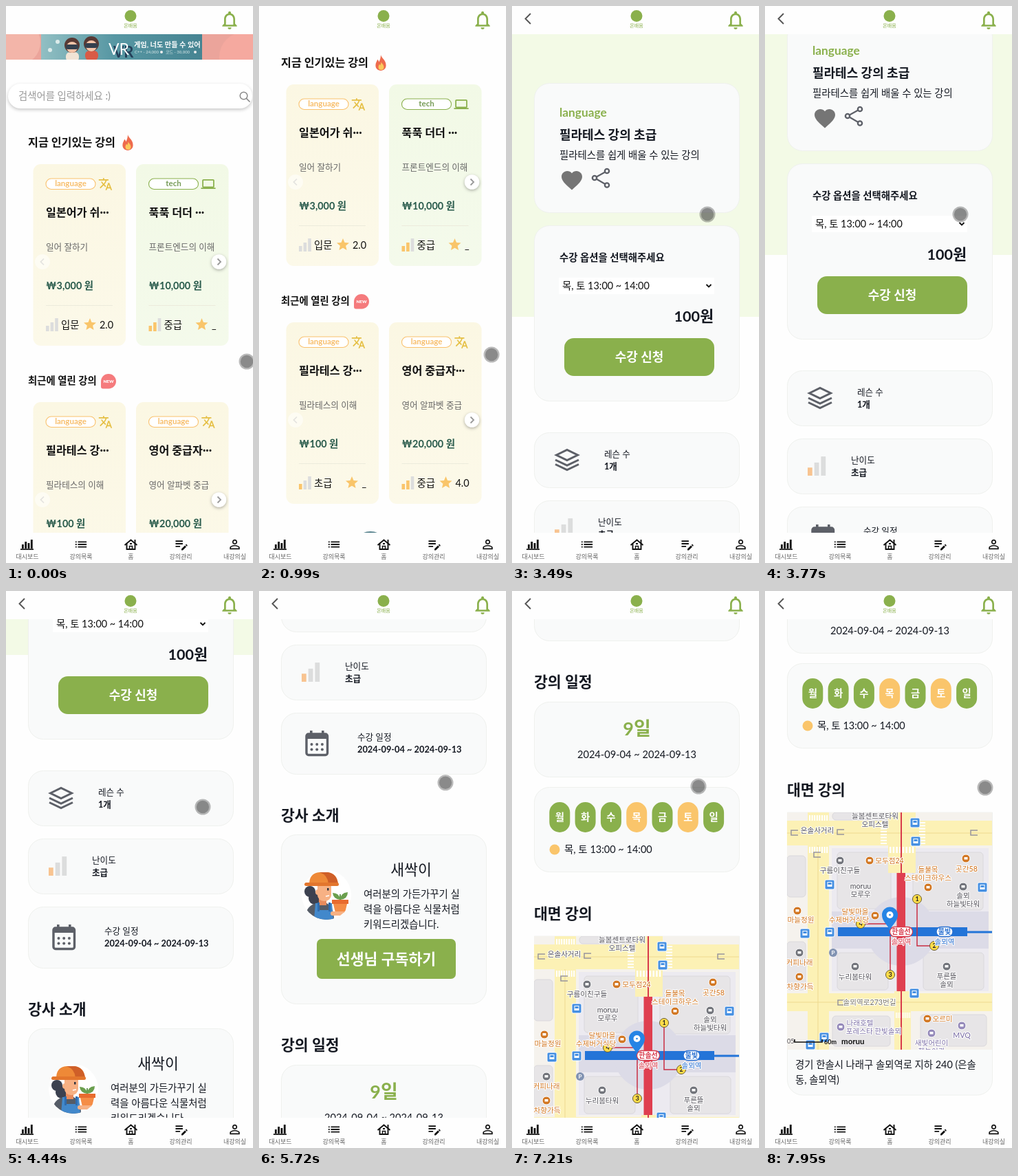
Animation, 359 px wide and 810 px high, one loop 8000 ms. Source, as an HTML page with a canvas:

```html
<!DOCTYPE html>
<html lang="ko">
<head>
<meta charset="utf-8">
<title>강의 앱</title>
<style>
html, body { margin: 0; width: 100%; height: 100%; overflow: hidden; background: #fefefe; }
canvas { display: block; width: 359px; height: 810px; }
</style>
</head>
<body>
<canvas id="stage"></canvas>
<script>
const W = 359, H = 810, LOOP = 8000, OPEN_AT = 1890;
const FONT = 'Lato, "Noto Sans CJK KR", "Noto Sans CJK", "Noto Sans CJK JP", sans-serif';
const GREEN = '#8ab04c', AMBER = '#fac56b', INK = '#141821', GREY = '#5d6068';
const stage = document.getElementById('stage');
const c = stage.getContext('2d');
const dpr = window.devicePixelRatio || 1;
stage.width = W * dpr;
stage.height = H * dpr;

const ICON = {
  translate: 'M12.87 15.07l-2.54-2.51.03-.03c1.74-1.94 2.98-4.17 3.71-6.53H17V4h-7V2H8v2H1v1.99h11.17C11.5 7.92 10.44 9.75 9 11.35 8.07 10.32 7.3 9.19 6.69 8h-2c.73 1.63 1.73 3.17 2.98 4.56l-5.09 5.02L4 19l5-5 3.11 3.11.76-2.04zM18.5 10h-2L12 22h2l1.12-3h4.75L21 22h2l-4.5-12zm-2.62 7l1.62-4.33L19.12 17h-3.24z',
  laptop: 'M20 18c1.1 0 1.99-.9 1.99-2L22 6c0-1.1-.9-2-2-2H4c-1.1 0-2 .9-2 2v10c0 1.1.9 2 2 2H0v2h24v-2h-4zM4 6h16v10H4V6z',
  bell: 'M12 22c1.1 0 2-.9 2-2h-4c0 1.1.89 2 2 2zm6-6v-5c0-3.07-1.64-5.64-4.5-6.32V4c0-.83-.67-1.5-1.5-1.5s-1.5.67-1.5 1.5v.68C7.63 5.36 6 7.92 6 11v5l-2 2v1h16v-1l-2-2zm-2 1H8v-6c0-2.48 1.51-4.5 4-4.5s4 2.02 4 4.5v6z',
  list: 'M3 13h2v-2H3v2zm0 4h2v-2H3v2zm0-8h2V7H3v2zm4 4h14v-2H7v2zm0 4h14v-2H7v2zM7 7v2h14V7H7z',
  edit: 'M3 10h11v2H3v-2zm0-2h11V6H3v2zm0 8h7v-2H3v2zm15.01-3.13.71-.71c.39-.39 1.02-.39 1.41 0l.71.71c.39.39.39 1.02 0 1.41l-.71.71-2.12-2.12zm-.71.71-5.3 5.3V21h2.12l5.3-5.3-2.12-2.12z',
  person: 'M12 5.9c1.16 0 2.1.94 2.1 2.1s-.94 2.1-2.1 2.1S9.9 9.16 9.9 8s.94-2.1 2.1-2.1m0 9c2.97 0 6.1 1.46 6.1 2.1v1.1H5.9V17c0-.64 3.13-2.1 6.1-2.1M12 4C9.79 4 8 5.79 8 8s1.79 4 4 4 4-1.79 4-4-1.79-4-4-4zm0 9c-2.67 0-8 1.34-8 4v3h16v-3c0-2.66-5.33-4-8-4z',
  star: 'M12 17.27L18.18 21l-1.64-7.03L22 9.24l-7.19-.61L12 2 9.19 8.63 2 9.24l5.46 4.73L5.82 21z',
  heart: 'M12 21.35l-1.45-1.32C5.4 15.36 2 12.28 2 8.5 2 5.42 4.42 3 7.5 3c1.74 0 3.41.81 4.5 2.09C13.09 3.81 14.76 3 16.5 3 19.58 3 22 5.42 22 8.5c0 3.78-3.4 6.86-8.55 11.54L12 21.35z',
  flame: 'M12 0C13 5 20 8 20 16c0 5-3.5 8-8 8s-8-3-8-8c0-4 2-6 3-9 1 1 2 2 2 4 2-3 3-7 3-11z'
};
for (const k in ICON) ICON[k] = new Path2D(ICON[k]);

// Drawing helpers
function text(s, x, y, size, color = INK, weight = 400, align = 'left') {
  c.font = `${weight} ${size}px ${FONT}`;
  c.textAlign = align;
  c.fillStyle = color;
  c.fillText(s, x, y + size * 0.37);
}
const mid = (s, x, y, size, color, weight) => text(s, x, y, size, color, weight, 'center');
function rect(x, y, w, h, color) {
  c.fillStyle = color;
  c.fillRect(x, y, w, h);
}
function box(x, y, w, h, r, fill, edge, lw = 1) {
  c.beginPath();
  c.roundRect(x, y, w, h, r);
  if (fill) { c.fillStyle = fill; c.fill(); }
  if (edge) { c.strokeStyle = edge; c.lineWidth = lw; c.stroke(); }
}
function disc(x, y, r, fill, edge, lw = 1) {
  box(x - r, y - r, 2 * r, 2 * r, r, fill, edge, lw);
}
function line(pts, color, lw, close) {
  c.beginPath();
  for (let i = 0; i < pts.length; i += 2) c.lineTo(pts[i], pts[i + 1]);
  if (close) c.closePath();
  c.strokeStyle = color;
  c.lineWidth = lw;
  c.stroke();
}
function icon(name, x, y, scale, color) {
  c.save();
  c.translate(x - 12 * scale, y - 12 * scale);
  c.scale(scale, scale);
  c.fillStyle = color;
  c.fill(ICON[name], 'evenodd');
  c.restore();
}
function shifted(dy, draw) {
  c.save();
  c.translate(0, dy);
  draw();
  c.restore();
}
function shadowed(color, blur, dy, draw) {
  c.save();
  c.shadowColor = color;
  c.shadowBlur = blur * dpr;
  c.shadowOffsetY = dy * dpr;
  draw();
  c.restore();
}
function bars(x, y, level, s = 1, on = AMBER) {
  [8, 13, 19].forEach((h, i) =>
    rect(x + i * 6.6 * s, y - h * s, 4.6 * s, h * s, i < level ? on : '#dcdddd'));
}

// Timing: every move advances in n even steps between two times
function phase(t, t0, t1, n) {
  if (t < t0) return 0;
  if (n < 2) return 1;
  return Math.min(1, (Math.floor((t - t0) / (t1 - t0) * (n - 1) + 0.1) + 1) / n);
}
const ease = (p, a) => p ** a / (p ** a + (1 - p) ** a);
const HOME_SCROLL = [[650, 1270, 10, 180, 1.47]];
const CLASS_SCROLL = [
  [3280, 3770, 8, 180, 1.47], [4100, 4440, 5, 269, 2.2], [5040, 5390, 6, 270, 2.2],
  [5720, 6000, 5, 270, 2.2], [6940, 7210, 5, 270, 2.2], [7410, 7950, 9, 180, 1.47]
];
const scrollAt = (t, moves) => Math.round(moves.reduce(
  (sum, [t0, t1, n, d, a]) => sum + d * ease(phase(t, t0, t1, n), a), 0));
const TOUCH = [
  [120, 190, 2, 340, 517], [650, 990, 6, 338, 507], [1470, 1750, 4, 117, 516.5],
  [2470, 2470, 1, 117, 509.5], [2930, 3080, 3, 249, 306], [3280, 3490, 4, 284, 303],
  [4100, 4440, 5, 286, 314], [4710, 4780, 2, 268, 236], [5040, 5390, 6, 271, 278],
  [5720, 6000, 5, 271, 282], [6610, 6610, 1, 271, 284], [7410, 7950, 9, 320, 286]
];
function touch(t) {
  let x = 350, y = 517;
  for (const [t0, t1, n, tx, ty] of TOUCH) {
    const p = phase(t, t0, t1, n);
    x += (tx - x) * p;
    y += (ty - y) * p;
  }
  disc(x, y, 11.5, 'rgba(0,0,0,.27)');
  disc(x, y, 9.2, 'rgba(0,0,0,.25)');
}

// Home page
function banner() {
  rect(0, 41, W, 37, '#eba49b');
  c.save();
  c.beginPath();
  c.rect(0, 41, W, 37);
  c.clip();
  disc(18, 53, 32, '#f3b5a9');
  disc(346, 74, 36, '#f5a99f');
  const g = c.createLinearGradient(51, 0, 285, 0);
  g.addColorStop(0, '#91bfc3');
  g.addColorStop(0.45, '#5797a3');
  g.addColorStop(1, '#468492');
  rect(51, 41, 234, 37, g);
  for (const [x, y, top] of [[96, 62, '#f1e4d5'], [124, 60, '#d85b47']]) {
    box(x - 9, y + 5, 19, 14, 6, top);
    disc(x, y - 5, 11, '#583a35');
    disc(x, y - 2, 8, '#f5c4a8');
    box(x - 9, y - 6, 18, 7, 3, '#34404e');
  }
  disc(75, 52, 3, '#dcebea');
  disc(64, 64, 3, '#dcebea');
  text('VR', 156, 67, 22, '#243f59', 700);
  text('VR', 149, 62, 23, '#fff');
  text('게임, 너도 만들 수 있어', 186, 56, 10.2, '#fff', 700);
  text('C++ - 24,000', 187, 67, 6, '#dcebeb');
  disc(226, 67, 2, '#eee');
  text('코드 - 30,000', 232, 67, 6, '#dcebeb');
  disc(275, 67, 2, '#eee');
  c.restore();
}
function lesson(x, tech, title, sub, price, level, grade, score, starX) {
  const g = c.createLinearGradient(0, 230, 0, 494);
  g.addColorStop(0, tech ? '#f2f9e6' : '#fbf7e3');
  g.addColorStop(1, tech ? '#f4faeb' : '#fcf9e9');
  box(x, 230, 134.5, 264, 11, g);
  const l = x + 18.5, hue = tech ? GREEN : '#f9c16d';
  box(l, 251, 72, 15.5, 7.8, '#fff', hue, 1.1);
  mid(tech ? 'tech' : 'language', l + 36, 258, 11.5, tech ? '#769b57' : '#f7bd69', 700);
  icon(tech ? 'laptop' : 'translate', x + 105, 259, 0.88, tech ? GREEN : '#e5bf43');
  text(title + '···', l, 300, 16.2, '#111', 700);
  text(sub, l, 350, 12.6, '#666');
  text(price, l, 407, 14.4, '#285a4b', 700);
  rect(l, 435, 97, 1, '#ecebdc');
  bars(l, 473, level);
  text(grade, l + 22, 464, 14.4, '#111');
  icon('star', x + starX, 463, 0.9, '#f9c56a');
  text(score, x + 116.5, 464, 14.4, '#111', 400, score === '_' ? 'right' : 'right');
}
function arrows() {
  c.save();
  c.globalAlpha = 0.5;
  disc(53, 372, 11, '#fff');
  line([55, 367.5, 50.5, 372, 55, 376.5], '#ccc', 1.7);
  c.restore();
  shadowed('rgba(0,0,0,.3)', 4, 1.5, () => disc(309.5, 372, 10.8, '#fff'));
  line([307.5, 367.5, 312, 372, 307.5, 376.5], '#999', 1.8);
}
function home(scroll) {
  c.translate(0, -scroll);
  banner();
  shadowed('rgba(0,0,0,.22)', 5, 2, () => box(3, 113, 355, 36, 18, '#fff'));
  text('검색어를 입력하세요 :)', 18, 131, 14.4, '#999', 500);
  c.lineCap = 'round';
  disc(345.5, 130.5, 5.3, null, '#888', 1.5);
  line([349.5, 134.5, 354, 139], '#888', 1.7);
  c.lineCap = 'butt';

  text('지금 인기있는 강의', 32, 198, 16.2, '#111', 700);
  icon('flame', 177, 198.5, 0.95, '#ee6b4d');
  icon('flame', 177.5, 203, 0.5, '#fbc95c');
  lesson(39.5, false, '일본어가 쉬', '일어 잘하기', '₩3,000 원', 0, '입문', '2.0', 82.5);
  lesson(189, true, '푹푹 더더 ', '프론트엔드의 이해', '₩10,000 원', 2, '중급', '_', 95.5);
  arrows();

  text('최근에 열린 강의', 32, 545, 14.4, '#111', 700);
  box(138, 535, 22, 21.5, [11, 11, 11, 3], '#f57b7d');
  mid('NEW', 149, 546, 6.2, '#fff', 900);
  shifted(346, () => {
    lesson(39.5, false, '필라테스 강', '필라테스의 이해', '₩100 원', 1, '초급', '_', 95.5);
    lesson(189, false, '영어 중급자', '영어 알파벳 중급', '₩20,000 원', 2, '중급', '4.0', 82.5);
    arrows();
  });
  disc(162, 908, 28, '#55818c');
}

// Class page; sections sit at their own scroll positions
function card(y, bottom) {
  box(32.5, y + 0.5, 298, bottom - y - 1, 22, '#f9fafa', '#eff1ee');
}
function summary() {
  rect(0, -200, W, 652, '#f3fae6');
  card(112, 301);
  text('language', 69, 155, 17.3, GREEN, 700);
  text('필라테스 강의 초급', 69, 187, 18, INK, 700);
  text('필라테스를 쉽게 배울 수 있는 강의', 69, 217, 14.4);
  icon('heart', 87, 253.5, 1.5, '#757575');
  line([138, 240, 120, 250, 138, 260.5], GREY, 2.2);
  for (const [x, y] of [[138, 240], [120, 250], [138, 260.5]]) disc(x, y, 3.1, '#f9fafa', GREY, 2.4);

  card(319, 575);
  text('수강 옵션을 선택해주세요', 69, 366, 14.4, INK, 700);
  rect(68, 395, 226, 24, '#fff');
  text('목, 토 13:00 ~ 14:00', 73, 407, 14.4, '#111');
  line([282.5, 405, 286, 408.5, 289.5, 405], '#111', 1.9);
  text('100원', 293, 451, 21.6, INK, 700, 'right');
  box(76, 483, 218, 55, 14, GREEN);
  mid('수강 신청', 185, 510, 18, '#fff', 700);
}
function facts() {
  card(261, 342);
  line([64.5, 294, 80, 286.5, 95.5, 294, 80, 301.5], GREY, 3, true);
  line([63, 301, 80, 309, 97, 301], GREY, 3);
  line([63, 307.5, 80, 315.5, 97, 307.5], GREY, 3);
  text('레슨 수', 134, 292, 12.6, INK, 500);
  text('1개', 134, 310, 12.6, INK, 700);
  card(360, 441);
  bars(62, 414, 1, 1.47, '#f8c491');
  text('난이도', 125, 391, 12.6, INK, 500);
  text('초급', 125, 409, 12.6, INK, 700);
  card(459, 549);
  box(69, 490, 30.5, 30.5, 3, null, GREY, 3.4);
  rect(69, 489, 30, 8, GREY);
  rect(74, 485, 3.6, 6, GREY);
  rect(91, 485, 3.6, 6, GREY);
  for (let i = 0; i < 6; i++) disc(76.5 + i % 3 * 7.7, 505 + (i > 2) * 7.5, 2, GREY);
  text('수강 일정', 143, 494, 12.6, INK, 500);
  text('2024-09-04 ~ 2024-09-13', 143, 512, 12.8, INK, 700);
}
function shape(d, color) {
  c.fillStyle = color;
  c.fill(new Path2D(d));
}
function gardener() {
  c.save();
  c.beginPath();
  c.arc(98, 442, 36, 0, 7);
  c.fillStyle = '#fff';
  c.fill();
  c.clip();
  disc(74, 437, 8, '#3c4150');
  disc(81, 447, 9, '#3c4150');
  shape('M67 478q0-22 20-25h8q14 3 14 25z', '#555c67');
  rect(87, 444, 11, 13, '#e98c5d');
  box(85, 424, 20, 27, [3, 3, 9, 9], '#f7b184');
  disc(86, 438, 4, '#f7b184');
  rect(99, 432, 2.5, 3.5, '#30343f');
  line([97, 444, 102, 443], '#fff', 1.6);
  shape('M82 454h5v10h14v-10h5l2 24H80z', '#4288cb');
  rect(85, 453, 3, 13, '#2f6cae');
  rect(101, 453, 3, 13, '#2f6cae');
  shape('M73 427q0-17 15-18h12q14 2 15 18z', '#ee8937');
  shape('M88 409h12q13 2 15 17h-14q-1-13-13-17z', '#cf5f28');
  box(66, 424, 50, 5, 2.5, '#e3762d');
  line([118, 452, 118, 441], '#5a9147', 1.8);
  shape('M118 449q-10-1-11-10 10 0 11 10zM118 449q0-10 11-11 0 10-11 11z', '#6b9f4e');
  rect(106, 449, 24, 6, '#e86b2e');
  shape('M108 455h20l-3 13h-14z', '#f58d46');
  box(104, 466, 22, 6, 3, '#f7b184');
  c.restore();
}
function teacher() {
  text('강사 소개', 32, 326, 21.6, INK, 700);
  card(354, 601);
  gardener();
  mid('새싹이', 221, 405, 21.6, INK, 500);
  ['여러분의 가든가꾸기 실', '력을 아름다운 식물처럼', '키워드리겠습니다.']
    .forEach((s, i) => text(s, 152, 441 + i * 21.7, 14.4));
  box(84, 506, 202, 58, 7, GREEN);
  mid('선생님 구독하기', 185, 535, 21.6, '#fff', 700);
}
function schedule() {
  text('강의 일정', 32, 402, 21.6, INK, 700);
  card(431, 541);
  mid('9일', 181.5, 470, 27, GREEN, 700);
  mid('2024-09-04 ~ 2024-09-13', 181.5, 508, 14.6, INK);
  card(555, 679);
  [...'월화수목금토일'].forEach((d, i) => {
    const x = 69.3 + i * 37.3;
    box(x - 15, 577, 30, 44, 15, '목토'.includes(d) ? AMBER : GREEN);
    mid(d, x, 599, 14.4, '#fff', 700);
  });
  disc(62, 646, 7.5, AMBER);
  text('목, 토 13:00 ~ 14:00', 76, 646, 14.5);
}

function label(x, y, color, ...rows) {
  c.lineJoin = 'round';
  rows.forEach((s, i) => {
    c.font = `500 10.6px ${FONT}`;
    c.textAlign = 'center';
    c.strokeStyle = '#fff';
    c.lineWidth = 2.2;
    c.strokeText(s, x, y + i * 12 + 3.9);
    mid(s, x, y + i * 12, 10.6, color, 500);
  });
  c.lineJoin = 'miter';
}
function spot(x, y, color) {
  disc(x, y, 6, color, '#fff');
  rect(x - 2.5, y - 2, 5, 3.5, '#fff');
}
function map() {
  c.save();
  c.beginPath();
  c.rect(32, 322, 298, 345);
  c.clip();
  rect(32, 322, 298, 345, '#f5f2ed');
  const road = '#fcf1b5', block = '#e7e5e7', mall = '#dcdbe7';
  rect(97, 374, 228, 208, '#eceaf0');
  for (const [x, y, w, h] of [[105, 380, 78, 82], [215, 380, 102, 84], [105, 526, 74, 54],
    [230, 526, 88, 54], [98, 618, 84, 44], [226, 616, 96, 46], [32, 385, 27, 60], [32, 510, 27, 70],
    [98, 322, 82, 11]]) box(x, y, w, h, 5, block, '#dad8dc');
  rect(97, 466, 228, 54, mall);
  disc(198, 495, 50, mall);
  rect(32, 334, 298, 36, road);
  rect(62, 322, 31, 345, road);
  rect(179, 322, 40, 88, road);
  rect(32, 585, 298, 26, road);
  rect(188, 582, 24, 85, road);
  line([32, 352, 330, 352], '#eed98f', 1);
  line([77, 370, 77, 667], '#eed98f', 1);
  line([32, 598, 330, 598], '#eed98f', 1);
  for (let i = 0; i < 8; i++) {
    rect(64 + i * 3.6, 326, 2, 8, '#fff');
    rect(64 + i * 3.6, 372, 2, 9, '#fff');
    rect(181 + i * 4.7, 372, 2.4, 9, '#fff');
    rect(224, 336 + i * 4.3, 9, 2, '#fff');
    rect(168, 336 + i * 4.3, 9, 2, '#fff');
    rect(190 + i * 2.8, 613, 1.5, 8, '#fff');
  }
  const turn = '#96949c';
  for (const [x, y] of [[43, 351], [110, 350], [304, 351], [76, 383], [111, 598]])
    line([x + 5, y + 4, x - 5, y + 4, x - 5, y - 3, x + 5, y - 3], turn, 1.5);

  rect(197, 322, 2, 345, '#d83a4b');
  rect(191.5, 410, 12.5, 172, '#df3f50');
  rect(106, 489, 188, 13, '#2374d8');
  rect(294, 494.5, 36, 3, '#2374d8');
  const exit = '#c92e43';
  line([139, 484, 182, 484, 182, 490], exit, 1.5);
  line([182, 502, 182, 558], exit, 1.5);
  line([221, 448, 221, 516, 246, 516], exit, 1.5);
  [[221, 448], [246, 516], [182, 558], [139, 484]].forEach(([x, y], i) => {
    disc(x, y, 6.5, '#ffdd4a', '#665b30');
    mid(i + 1, x, y, 9, '#222', 700);
  });

  const food = '#d27723', dark = '#55535b', plum = '#7f72a8', blue = '#286fd0';
  for (const [x, y] of [[218, 337], [219, 364], [94, 427], [58, 498], [316, 431], [94, 496], [217, 585], [86, 649], [66, 660]]) {
    box(x - 7, y - 7, 14, 14, 2, '#4690e2', '#fff');
    rect(x - 3.5, y - 4, 7, 7, '#fff');
    rect(x - 2.5, y - 3, 5, 3, '#4690e2');
  }
  for (const [x, y] of [[152, 392], [292, 389], [237, 431], [160, 472], [47, 465], [50, 561], [236, 622]]) spot(x, y, food);
  for (const [x, y] of [[109, 392], [288, 430], [131, 546], [264, 546], [50, 526]]) spot(x, y, '#72747b');
  for (const [x, y] of [[110, 634], [242, 643], [286, 632]]) spot(x, y, '#958aba');
  disc(99, 526, 6, '#8193b2');
  mid('P', 99, 526, 8, '#fff', 700);
  label(76, 348, dark, '은솔사거리');
  label(160, 327, dark, '늘봄센트로타워', '오피스텔');
  label(181, 392, food, '모두점24');
  label(109, 406, dark, '구름이친구들');
  label(139, 429, dark, 'moruu', '모루우');
  label(237, 405, food, '들불목', '스테이크하우스');
  label(293, 404, food, '곳간58');
  label(288, 443, dark, '솔뫼', '하늘빛타워');
  label(131, 466, food, '달빛마을');
  label(122, 478, food, '수제버거식당');
  label(52, 478, food, '마늘정원');
  label(50, 540, food, '커피나래');
  label(51, 575, food, '차향가득');
  label(131, 561, dark, '누리봄타워');
  label(264, 560, dark, '푸른뜰', '솔뫼');
  label(152, 598, '#7d7968', '솔뫼역로273번길');
  label(138, 628, plum, '나래호텔');
  label(158, 640, plum, '포레스타 한빛솔뫼');
  label(258, 622, food, '오르미');
  label(286, 646, plum, 'MVQ');
  label(242, 657, plum, '새빛어린이', '책놀이관');
  for (const [x, w, name, color] of [[198, 33, '한솔선', '#d83a4b'], [261, 24, '물빛', blue]]) {
    box(x - w / 2, 488.5, w, 14, 7, '#fff', color, 1.3);
    mid(name, x, 495.5, 10, color, 700);
    label(x, 510, color, '솔뫼역');
  }
  shape('M181.5 493C177 484 170 480 170 471a11.5 11.5 0 0 1 23 0c0 9-7 13-11.5 22z', '#2684e5');
  disc(181.5, 471, 5, '#fff');
  disc(181.5, 471, 1.3, '#2684e5');
  text('05', 32, 655, 9, dark);
  line([43, 652, 43, 656, 83, 656, 83, 652], '#111', 1.7);
  text('60m', 86, 656, 9, '#111', 700);
  text('moruu', 111, 655, 11.5, '#111', 700);
  c.restore();
}
function place() {
  text('대면 강의', 32, 289, 21.6, INK, 700);
  box(32.5, 322, 298, 411, [0, 0, 22, 22], '#f9fafa', '#eff1ee');
  map();
  text('경기 한솔시 나래구 솔뫼역로 지하 240 (은솔', 44, 689, 14.4);
  text('동, 솔뫼역)', 44, 711, 14.4);
}
function classPage(scroll) {
  c.translate(0, -scroll);
  summary();
  shifted(359, facts);
  shifted(641, teacher);
  shifted(899, schedule);
  shifted(1349, place);
}

// Fixed bars
function header(back) {
  rect(0, 0, W, 41, '#fefefe');
  disc(181, 14.5, 8.5, GREEN);
  mid('온배움', 181, 28, 7, GREEN, 500);
  icon('bell', 325, 20.5, 1.33, GREEN);
  if (back) line([27, 11, 19.5, 18.5, 27, 26], '#555', 1.9);
}
function tabs() {
  rect(0, 766, W, 44, '#fefefe');
  [6, 10, 8, 13].forEach((h, i) => rect(23 + i * 4.3, 789 - h, 2.8, h, '#111'));
  rect(21, 789.3, 19, 1.7, '#111');
  icon('list', 109, 783, 0.9, '#111');
  line([172.5, 784, 181.5, 776.5, 190.5, 784], '#111', 1.9);
  line([175.5, 782, 175.5, 790, 187.5, 790, 187.5, 776], '#111', 1.9);
  line([179.5, 790, 179.5, 785.5, 183.5, 785.5, 183.5, 790], '#111', 1.5);
  rect(180, 781, 3, 2, '#111');
  icon('edit', 255, 783, 0.95, '#111');
  icon('person', 332.5, 783, 0.9, '#111');
  [['대시보드', 31], ['강의목록', 109], ['홈', 181.5], ['강의관리', 254], ['내강의실', 332.5]]
    .forEach(([s, x]) => mid(s, x, 801, 9, '#666', 500));
}

function frame() {
  const t = performance.now() % LOOP, opened = t >= OPEN_AT;
  c.setTransform(dpr, 0, 0, dpr, 0, 0);
  rect(0, 0, W, H, '#fefefe');
  c.save();
  if (opened) classPage(scrollAt(t, CLASS_SCROLL) - 90);
  else home(scrollAt(t, HOME_SCROLL));
  c.restore();
  header(opened);
  tabs();
  touch(t);
  requestAnimationFrame(frame);
}
frame();
</script>
</body>
</html>
```
